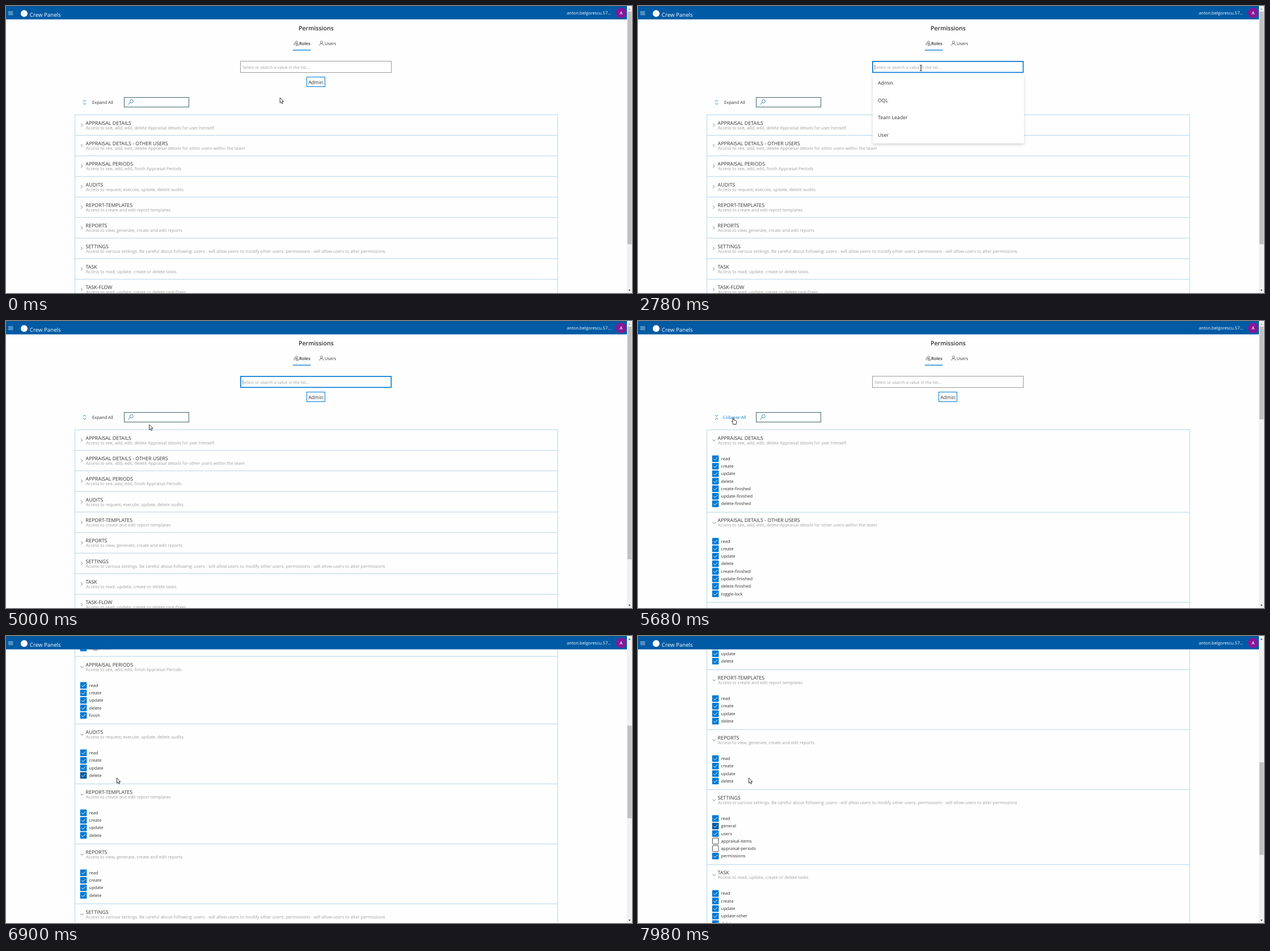
Animation of 1104 by 507 pixels, one loop 8000 ms. Source, as an HTML page:

```html
<!DOCTYPE html>
<html lang="en">
<head>
<meta charset="utf-8">
<title>Permissions</title>
<style>
  html, body { margin: 0; width: 100%; height: 100%; overflow: hidden; background: #fefefe; }
  svg { display: block; width: 1104px; height: 507px; }
  text { font: 7.6px "Open Sans", "Noto Sans", sans-serif; fill: #323130; text-rendering: geometricPrecision; white-space: pre; }
  .title { font-size: 8.85px; }
  .desc { font-size: 7.62px; fill: #a19f9d; }
  .item { font-size: 7.55px; }
  .menu { font-size: 8.75px; }
  .hint { font-size: 7.27px; fill: #a19f9d; }
  .semi { font-weight: 600; }
  .white { fill: #fff; }
  .rule { fill: none; stroke: #b2d5ea; }
  .line { fill: none; stroke: #484644; stroke-width: .7; }
  .blue { fill: none; stroke: #0078d4; }
  .field { fill: #fff; stroke: #9b9a99; }
  .field.hot { stroke: #323130; }
  .box { fill: #0078d4; }
  .box.empty { fill: #fff; stroke: #323130; stroke-width: .9; }
  .box.hot { fill: #005a9e; }
  .tick { fill: none; stroke: #fff; }
  .cursor { fill: #fff; stroke: #222; stroke-width: .9; stroke-linejoin: round; }
  #expand.hot text { fill: #0078d4; }
</style>
</head>
<body>
<svg viewBox="0 0 1104 507">
  <defs>
    <filter id="shadow" x="-5%" y="-10%" width="110%" height="125%">
      <feDropShadow dx="0" dy="2" stdDeviation="2.4" flood-opacity=".2"/>
    </filter>
  </defs>

  <g id="page">
    <text x="516" y="43.2" class="semi" style="font-size:10.6px">Permissions</text>

    <rect id="usersHover" x="546.5" y="54" width="41" height="25" fill="#edebe9"/>
    <g class="line">
      <circle cx="512.6" cy="63.8" r="1.7"/>
      <path d="M509.6 69.6q.2-3.6 3-3.9M509.8 63.2q-1.4 1-.1 2.3-2 .8-2 3.2"/>
      <rect x="512.6" y="67" width="2.8" height="2.8"/>
      <circle cx="556.4" cy="64" r="2.1"/>
      <path d="M552.9 70q.2-3.8 3.5-3.8t3.5 3.8"/>
    </g>
    <text x="517" y="68.7" class="semi">Roles</text>
    <text x="562" y="68.7">Users</text>
    <rect x="506" y="77.3" width="31.5" height="1.3" fill="#0078d4"/>

    <rect id="input" class="field" x="413.5" y="97.5" width="266" height="20"/>
    <text x="417.3" y="111" class="hint">Select or search a value in the list...</text>
    <g id="focus">
      <rect class="blue" x="413.9" y="97.9" width="265.4" height="19.4" stroke-width="1.6"/>
      <path d="M417.5 104v8.5" stroke="#777" stroke-width=".7"/>
    </g>

    <rect class="blue" x="530.5" y="125.5" width="32" height="17"/>
    <text x="533.2" y="137.6" class="menu">Admin</text>

    <g id="expand">
      <g id="expandAll">
        <path class="blue" d="M136 168.6l2.5-2.5 2.5 2.5M136 171.6l2.5 2.5 2.5-2.5"/>
        <text x="152" y="173">Expand All</text>
      </g>
      <g id="collapseAll">
        <path class="blue" d="M136 166.2l2.5 2.5 2.5-2.5M136 174l2.5-2.5 2.5 2.5"/>
        <text x="149.8" y="173">Collapse All</text>
      </g>
    </g>
    <rect x="208.5" y="161.5" width="114" height="17" fill="#fff" stroke="#41666d"/>
    <path d="M215.6 174l3.6-3.7" fill="none" stroke="#2878b8"/>
    <circle cx="221.4" cy="168.3" r="2.9" fill="none" stroke="#2878b8" stroke-width=".9"/>

    <g id="closed"></g>
    <g id="open"></g>

    <g id="dropdown">
      <rect x="414" y="121.5" width="266.5" height="121" fill="#fff" filter="url(#shadow)"/>
      <rect id="option" x="414" width="266.5" height="30.5" fill="#f3f2f1"/>
    </g>
  </g>

  <rect width="1104" height="23.6" fill="#005aa4"/>
  <rect width="1104" height="1" fill="#14527f"/>
  <path d="M4 10.2h8.5M4 12.7h8.5M4 15.2h8.5" stroke="#dce9f4" stroke-width=".9"/>
  <circle cx="32" cy="13.2" r="6" class="white"/>
  <text x="41.8" y="19.4" class="white" style="font-size:9.7px">Crew Panels</text>
  <text x="989" y="15.2" class="white">anton.belgorescu.57...</text>
  <circle cx="1084.8" cy="12.2" r="9.1" fill="#881798"/>
  <text x="1084.8" y="15" class="white semi" text-anchor="middle">A</text>

  <rect x="1095" width="9" height="507" fill="#f1f1f1"/>
  <rect id="thumb" x="1096" width="7.5" fill="#c1c1c1"/>
  <path id="upArrow" d="M1097.4 6.6l2.2-2.6 2.2 2.6z"/>
  <path d="M1097.4 501l2.2 2.6 2.2-2.6z" fill="#505050"/>

  <g id="pointer">
    <path id="arrow" class="cursor" d="M.4 0v9.2l2.1-1.9 1.4 3.2 1.6-.7-1.4-3.1h2.8z"/>
    <path id="hand" class="cursor" d="M-.9.6Q0-.5.9.6V4l4 .9q1.2.4 1 1.7l-.7 3.4v1.6H-.2V10l-2.6-3.2q-.2-1.5 1.9-.1z"/>
    <path id="beam" d="M-2-5q1.6 0 2 .8.4-.8 2-.8M0-4.4v8.8M-2 5q1.6 0 2-.8.4.8 2 .8" fill="none" stroke="#111"/>
  </g>
</svg>

<script>
const LOOP = 8000;
const TOP = 192, ROW = 36.33, HEAD = 52.8, STEP = 13.28;
const MENU_TOP = 121.5, OPTION = 30.5;
const NOTCH = 57.6, HOVER_LAG = 100;
const MENU_OPENS = 2640, MENU_CLOSES = 4560, EXPANDS = 5480;

const CRUD = 'read create update delete';
const DONE = CRUD + ' create-finished update-finished delete-finished';
const sections = [
  ['APPRAISAL DETAILS', 'Access to see, add, edit, delete Appraisal details for user himself', DONE],
  ['APPRAISAL DETAILS - OTHER USERS', 'Access to see, add, edit, delete Appraisal details for other users within the team', DONE + ' toggle-lock'],
  ['APPRAISAL PERIODS', 'Access to see, add, edit, finish Appraisal Periods', CRUD + ' finish'],
  ['AUDITS', 'Access to request, execute, update, delete audits.', CRUD],
  ['REPORT-TEMPLATES', 'Access to create and edit report templates', CRUD],
  ['REPORTS', 'Access to view, generate, create and edit reports', CRUD],
  ['SETTINGS', 'Access to various settings. Be careful about following: users - will allow users to modify other users; permissions - will allow users to alter permissions', 'read general users appraisal-items appraisal-periods permissions'],
  ['TASK', 'Access to read, update, create or delete tasks', 'read create update update-other delete delete-other'],
  ['TASK-FLOW', 'Access to read, update, create or delete task flows', CRUD]
];
const boxes = [];

const $ = id => document.getElementById(id);
const show = (id, on) => { $(id).style.display = on ? '' : 'none'; };
const heat = (el, on) => el.classList.toggle('hot', on);

function add(parent, tag, attrs, text) {
  const el = document.createElementNS('http://www.w3.org/2000/svg', tag);
  for (const key in attrs) el.setAttribute(key, attrs[key]);
  if (text) el.textContent = text;
  return parent.appendChild(el);
}

function addItem(parent, name, y) {
  const empty = name.startsWith('appraisal-');
  const half = empty ? 5.3 : 5.8;
  const el = add(parent, 'rect', {
    class: empty ? 'box empty' : 'box', rx: 1,
    x: 136.6 - half, y: y - half, width: 2 * half, height: 2 * half
  });
  boxes.push({ el, y });
  if (!empty) add(parent, 'path', { class: 'tick', d: `M133.2 ${y}l2.4 2.4 4.6-4.7` });
  add(parent, 'text', { class: 'item', x: 146.6, y: y + 2.6 }, name);
}

function addList(parent, expanded) {
  let y = TOP;
  for (const [title, desc, list] of sections) {
    const items = list.split(' ');
    add(parent, 'path', { class: 'rule', d: `M121 ${y + .1}h852` });
    add(parent, 'path', {
      class: 'line',
      d: expanded ? `M131.4 ${y + 17.4}l2.7 2.7 2.7-2.7` : `M132.2 ${y + 15.6}l2.7 2.7-2.7 2.7`
    });
    add(parent, 'text', { class: 'title', x: 140.6, y: y + 17.7 }, title);
    add(parent, 'text', { class: 'desc', x: 140.8, y: y + 25.7 }, desc);
    if (expanded) items.forEach((name, i) => addItem(parent, name, y + 51.2 + i * STEP));
    y += expanded ? HEAD + items.length * STEP : ROW;
  }
  add(parent, 'path', { class: 'rule', d: `M121.5 ${TOP}V${y}H973V${TOP}` });
}

addList($('closed'), false);
addList($('open'), true);
['Admin', 'OQL', 'Team Leader', 'User'].forEach((name, i) =>
  add($('dropdown'), 'text', { class: 'menu', x: 423, y: 139.2 + i * OPTION }, name));

function ease(t, from, to) {
  const f = Math.min(1, Math.max(0, (t - from) / (to - from)));
  return f * f * (3 - 2 * f);
}

// Pointer moves: start, end and the place reached.
const rest = { x: 482.8, y: 162 };
const moves = [
  { from: 60, to: 130, x: 502, y: 127 },
  { from: 330, to: 1090, x: 530, y: 68 },
  { from: 1090, to: 1290, x: 600, y: 72 },
  { from: 1290, to: 1430, x: 528, y: 64.5 },
  { from: 1430, to: 1640, x: 483, y: 131 },
  { from: 2030, to: 2350, x: 517, y: 61 },
  { from: 2420, to: 2780, x: 499, y: 109.5 },
  { from: 2850, to: 3610, x: 460, y: 226 },
  { from: 3700, to: 4440, x: 438, y: 136 },
  { from: 4510, to: 5000, x: 252.3, y: 183 },
  { from: 5000, to: 5280, x: 168, y: 171 },
  { from: 5700, to: 6150, x: 202.5, y: 272.5 },
  { from: 6220, to: 6900, x: 195, y: 250.8 }
];
// Turns of the mouse wheel; the last one is cut by the loop.
const spins = [
  { from: 5888, to: 6900, notches: 8 },
  { from: 7035, to: 7310, notches: 5 },
  { from: 7640, to: 8147, notches: -2 }
];

function pointerAt(t) {
  return moves.reduce((p, m) => {
    const f = ease(t, m.from, m.to);
    return { x: p.x + (m.x - p.x) * f, y: p.y + (m.y - p.y) * f };
  }, rest);
}

const scrolled = progress => NOTCH * spins.reduce((sum, s) => sum + s.notches * progress(s), 0);
const inside = (p, x, y, w, h) => p.x > x && p.x < x + w && p.y > y && p.y < y + h;
const onUsersTab = p => inside(p, 546.5, 54, 41, 25);
const onExpandAll = p => inside(p, 133, 161, 62, 18);

function render(t) {
  const p = pointerAt(t), late = pointerAt(t - HOVER_LAG);
  const scroll = scrolled(s => ease(t, s.from, s.to));
  const settled = scrolled(s => t >= s.to ? 1 : 0);
  const expanded = t >= EXPANDS;
  const menu = t >= MENU_OPENS && t < MENU_CLOSES;
  const onInput = inside(p, 413, 97, 267, 21.5);
  const option = menu ? Math.floor((p.y - MENU_TOP) / OPTION) : -1;

  $('page').setAttribute('transform', `translate(0 ${-scroll})`);
  show('closed', !expanded);
  show('expandAll', !expanded);
  show('open', expanded);
  show('collapseAll', expanded);
  heat($('expand'), onExpandAll(late));
  show('usersHover', onUsersTab(late));
  heat($('input'), onInput);
  show('focus', t >= MENU_OPENS && !expanded);
  show('dropdown', menu);
  show('option', option >= 0);
  $('option').setAttribute('y', MENU_TOP + option * OPTION);

  // Row hover follows the page only once scrolling has settled.
  for (const { el, y } of boxes) heat(el, settled > 0 && Math.abs(p.y + settled - y) < STEP / 2);

  $('thumb').setAttribute('y', 10 + scroll * .3215);
  $('thumb').setAttribute('height', expanded ? 163.7 : 411);
  $('upArrow').setAttribute('fill', scroll > 0 ? '#505050' : '#a3a3a3');

  const hand = inside(p, 506, 54, 32, 25) || onUsersTab(p) || onExpandAll(p) || option >= 0;
  show('hand', hand);
  show('beam', onInput && !hand);
  show('arrow', !hand && !onInput);
  $('pointer').setAttribute('transform', `translate(${p.x} ${p.y})`);
}

function tick() {
  render(performance.now() % LOOP);
  requestAnimationFrame(tick);
}
tick();
</script>
</body>
</html>
```
